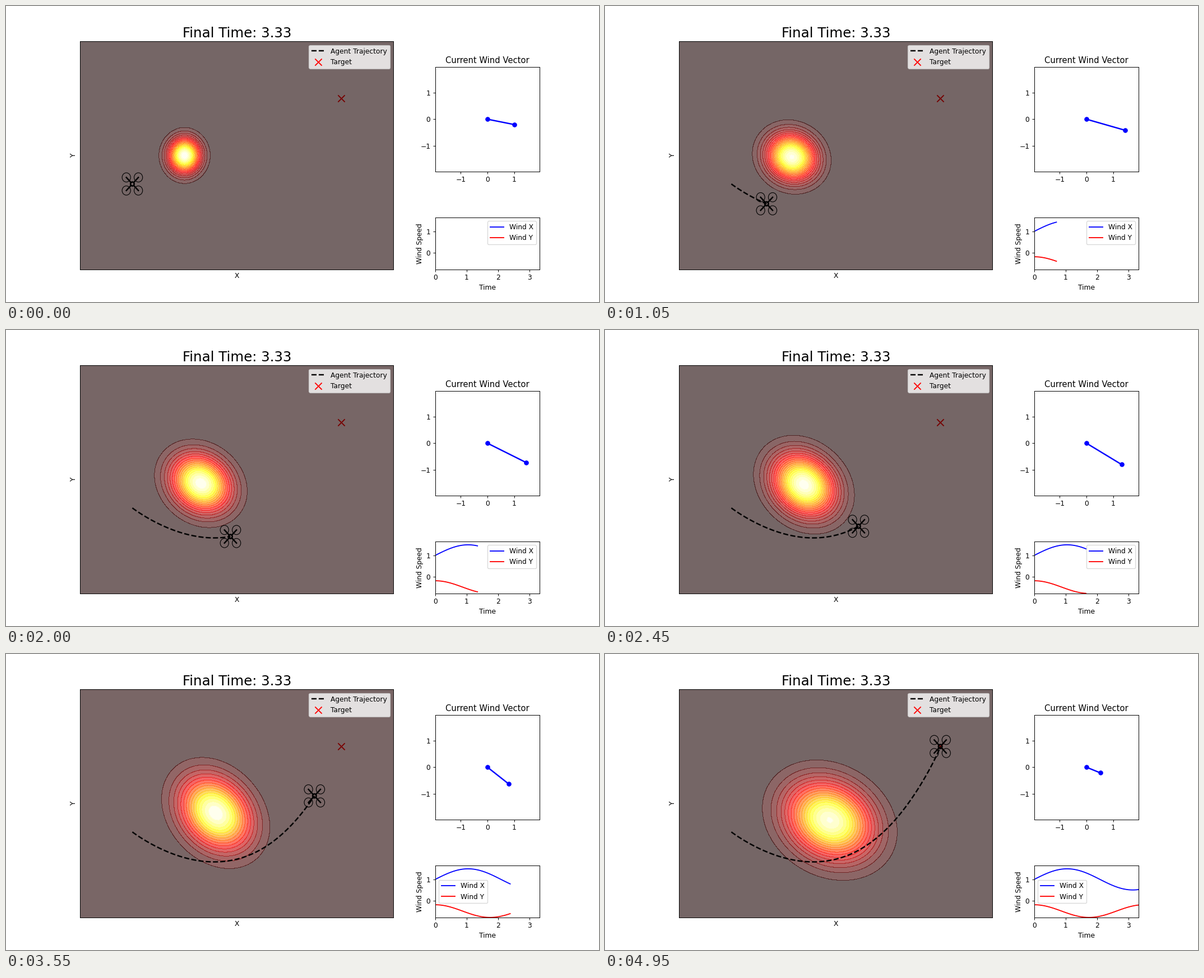
Recreate the animation shown at these times as a matplotlib script. Size 1058 by 529 pixels, loop 5 s.

```python
import numpy as np
import matplotlib.pyplot as plt
from matplotlib.animation import FuncAnimation
from matplotlib.patches import Circle

FRAMES = 100
INTERVAL = 50
FINAL_TIME = 3.33
START = np.array([-2.0, -0.5])
TARGET = np.array([2.0, 1.0])

times = np.linspace(0, FINAL_TIME, FRAMES)
wind_x = 1 + 0.5 * np.sin(1.5 * times)
wind_y = -0.5 + 0.3 * np.cos(1.8 * times)


def flight_path():
    """Smooth path from rest: start + s^2 * p(s), with p fitted to waypoints."""
    knots = np.array([13, 30, 49, 71, 85, 99]) / 99
    waypoints = np.array([(-1.719, -0.668), (-0.773, -0.998), (0.435, -0.821),
                          (1.487, 0.133), (1.873, 0.737), TARGET])
    s = np.linspace(0, 1, FRAMES)
    axes = []
    for axis in range(2):
        coeffs = np.polyfit(knots, (waypoints[:, axis] - START[axis]) / knots**2, 5)
        axes.append(START[axis] + s**2 * np.polyval(coeffs, s))
    return np.array(axes)


path_x, path_y = flight_path()
grid_x, grid_y = np.meshgrid(np.linspace(-3, 3, 121), np.linspace(-2, 2, 81))


def plume(i):
    """Drifting Gaussian that diffuses faster along the wind than across it."""
    t = times[i]
    dx = grid_x + 1 - 0.2087 * t - 0.0171 * t**2
    dy = grid_y + 0.0243 * t + 0.0191 * t**2
    speed = np.hypot(wind_x[i], wind_y[i])
    c, s = wind_x[i] / speed, wind_y[i] / speed
    along, across = c * dx + s * dy, c * dy - s * dx
    var_along, var_across = 0.04 + 0.08 * t, 0.04 + 0.04 * t
    peak = 0.04 / np.sqrt(var_along * var_across) * (1 + 0.045 * min(t, 1))
    return peak * np.exp(-along**2 / (2 * var_along) - across**2 / (2 * var_across))


fig = plt.figure(figsize=(12, 6), dpi=1058 / 12, facecolor="white")
grid = fig.add_gridspec(2, 2, width_ratios=[3, 1], height_ratios=[3, 1])
ax_map = fig.add_subplot(grid[:, 0])
ax_vector = fig.add_subplot(grid[0, 1])
ax_wind = fig.add_subplot(grid[1, 1])

# Map with plume, target and drone
ax_map.set(xlim=(-3, 3), ylim=(-2, 2), xticks=[], yticks=[], xlabel="X", ylabel="Y")
ax_map.set_title(f"Final Time: {FINAL_TIME:.2f}", fontsize=20)
trail, = ax_map.plot([], [], "k--", lw=2, label="Agent Trajectory")
ax_map.scatter(*TARGET, marker="x", s=100, color="red", zorder=0.9, label="Target")
ax_map.legend(loc="upper right")

ARM, HUB, ROTOR = 0.115, 0.035, 0.081
corners = [(a, b) for a in (-1, 1) for b in (-1, 1)]
arms = [ax_map.plot([], [], "k", lw=2, zorder=3)[0] for _ in corners]
rotors = [ax_map.add_patch(Circle((0, 0), ROTOR, fill=False, ec="k", lw=0.9, zorder=3))
          for _ in corners]
hub = ax_map.add_patch(Circle((0, 0), HUB, fill=False, ec="k", lw=2, zorder=3))

# Current wind vector
limit = 1.3 * 1.5
ax_vector.set(xlim=(-limit, limit), ylim=(-limit, limit),
              xticks=[-1, 0, 1], yticks=[-1, 0, 1], aspect="equal")
ax_vector.set_title("Current Wind Vector")
arrow, = ax_vector.plot([], [], "b-o", lw=2)

# Wind history
ax_wind.set(xlim=(0, FINAL_TIME), ylim=(-0.8, 1.65), xticks=range(4), yticks=[0, 1],
            xlabel="Time", ylabel="Wind Speed")
line_x, = ax_wind.plot([], [], "b", label="Wind X")
line_y, = ax_wind.plot([], [], "r", label="Wind Y")
ax_wind.legend(loc="best")

contours = []


def place_drone(x, y):
    hub.center = (x, y)
    for (a, b), arm, rotor in zip(corners, arms, rotors):
        inner = HUB * 0.7
        arm.set_data([x + a * inner, x + a * ARM], [y + b * inner, y + b * ARM])
        rotor.center = (x + a * ARM, y + b * ARM)


def update(i):
    while contours:
        contours.pop().remove()
    contours.append(ax_map.contourf(grid_x, grid_y, plume(i), levels=20,
                                    cmap="hot", alpha=0.6, zorder=1))
    trail.set_data(path_x[:i + 1], path_y[:i + 1])
    place_drone(path_x[i], path_y[i])
    arrow.set_data([0, wind_x[i]], [0, wind_y[i]])
    line_x.set_data(times[:i + 1], wind_x[:i + 1])
    line_y.set_data(times[:i + 1], wind_y[:i + 1])


anim = FuncAnimation(fig, update, frames=FRAMES, interval=INTERVAL,
                     init_func=lambda: update(0), repeat=True, repeat_delay=0)
plt.show()
```
